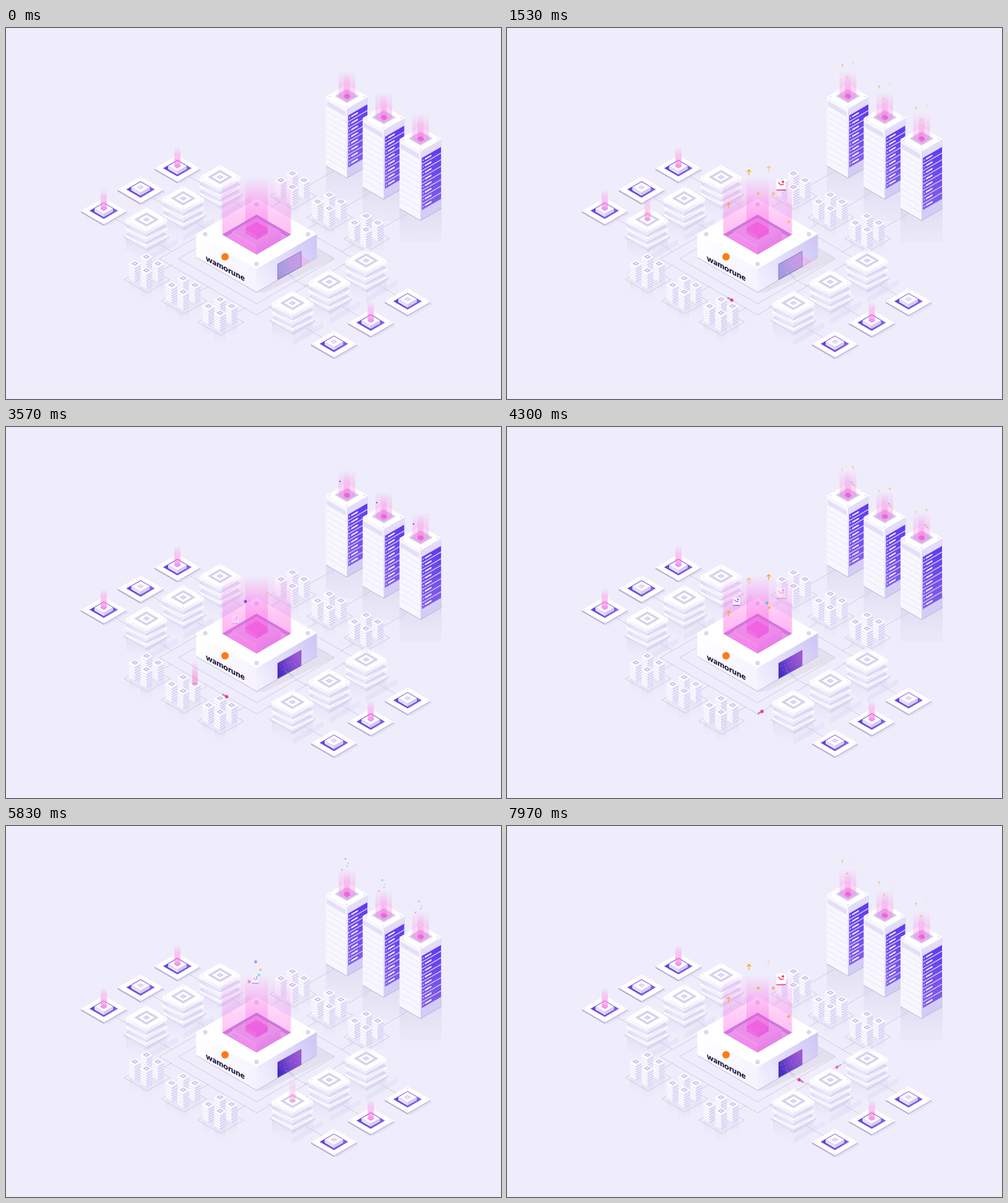
Animation, 800 px wide and 600 px high, one loop 8 s. Source, as an HTML page with a canvas:

```html
<!DOCTYPE html>
<html lang="en">
<head>
<meta charset="utf-8">
<title>Isometric server park</title>
<style>
html, body { margin: 0; width: 100%; height: 100%; overflow: hidden; background: #efedfb; }
#stage { position: absolute; left: 0; top: 0; width: 800px; height: 600px; overflow: hidden; }
canvas { position: absolute; left: 0; top: 0; width: 800px; height: 600px; }
#sign {
  position: absolute; left: 323px; top: 364px; color: #1d1640; white-space: nowrap;
  font: 900 13px/14px Lato, "Open Sans", sans-serif;
  transform: matrix(1, .54, 0, 1, 0, 0); transform-origin: 0 0;
}
</style>
</head>
<body>
<div id="stage"><canvas id="view"></canvas><div id="sign">wamorune</div></div>
<script>
const LOOP = 8000, CYCLE = 3150, SLOPE = .58;
const dpr = window.devicePixelRatio || 1;
const view = document.getElementById('view');
let ctx;

function context(canvas) {
  canvas.width = 800 * dpr;
  canvas.height = 600 * dpr;
  const c = canvas.getContext('2d');
  c.scale(dpr, dpr);
  return c;
}

function layer(paint) {
  const canvas = document.createElement('canvas');
  ctx = context(canvas);
  paint();
  return canvas;
}

const ramp = (t, from, to) => Math.max(0, Math.min(1, (t - from) / (to - from)));
const hump = (t, on, off, fade) => Math.min(ramp(t, on, on + fade), ramp(t, off, off - fade));
const range = n => [...Array(n).keys()];

function gradient(x0, y0, x1, y1, ...colors) {
  const g = ctx.createLinearGradient(x0, y0, x1, y1);
  colors.forEach((c, i) => g.addColorStop(i / (colors.length - 1), c));
  return g;
}

function poly(points, fill, stroke, width = 1) {
  ctx.beginPath();
  points.forEach(([x, y]) => ctx.lineTo(x, y));
  ctx.closePath();
  if (fill) { ctx.fillStyle = fill; ctx.fill(); }
  if (stroke) { ctx.strokeStyle = stroke; ctx.lineWidth = width; ctx.stroke(); }
}

function line(x0, y0, x1, y1, color, width = 1) {
  ctx.beginPath();
  ctx.moveTo(x0, y0);
  ctx.lineTo(x1, y1);
  ctx.strokeStyle = color;
  ctx.lineWidth = width;
  ctx.stroke();
}

function disc(x, y, r, color, flat = 1) {
  ctx.beginPath();
  ctx.ellipse(x, y, r, r * flat, 0, 0, 7);
  ctx.fillStyle = color;
  ctx.fill();
}

function diamond(x, y, w, fill, stroke, width) {
  const h = w * SLOPE;
  poly([[x - w, y], [x, y - h], [x + w, y], [x, y + h]], fill, stroke, width);
}

// A strip of a left (side -1) or right (side 1) face, a..b along its width.
function strip(x, y, w, side, top, height, fill, a = 0, b = 1) {
  const at = u => [x + side * w * u, y + w * SLOPE * (1 - u) + top];
  const [p, q] = [at(a), at(b)];
  poly([p, q, [q[0], q[1] + height], [p[0], p[1] + height]], fill);
}

function box(x, y, w, h, top, left, right) {
  strip(x, y, w, -1, 0, h, left);
  strip(x, y, w, 1, 0, h, right);
  diamond(x, y, w, top);
}

// The two lower edges of a diamond.
function hem(x, y, w, color) {
  for (const side of [-1, 1]) line(x, y + w * SLOPE, x + side * w, y, color, .9);
}

function studs(x, y, w, r, color) {
  for (const s of [-1, 1]) {
    disc(x + s * w, y, r, color);
    disc(x, y + s * w * SLOPE, r, color);
  }
}

function reflection(x, y, w, depth) {
  const g = gradient(0, y, 0, y + w * SLOPE + depth, 'rgba(205,197,235,.34)', 'rgba(225,220,245,0)');
  for (const side of [-1, 1]) strip(x, y, w, side, 0, depth, g);
}

function beam(x, base, w, top, alpha, rgb = '255,110,222') {
  const g = gradient(0, top, 0, base + w * SLOPE, `rgba(${rgb},0)`, `rgba(${rgb},${alpha * .6})`, `rgba(${rgb},${alpha})`);
  poly([[x - w, top], [x + w, top], [x + w, base], [x, base + w * SLOPE], [x - w, base]], g);
}

// Three neighbours along an isometric axis.
const trio = (x, y, right = 1, down = 1) => range(3).map(i => [x + 59.5 * i * right, y + 34.4 * i * down]);
const towers = trio(551, 111);
const plates = [...trio(158, 296, 1, -1), ...trio(649, 442.5, -1)];
const leftStacks = trio(346, 241, -1), rightStacks = trio(582, 376, -1);
const leftGroups = trio(227, 381), rightGroups = trio(463, 246);

const hub = [405, 373], RING = 157;
const south = [hub[0], hub[1] + RING * SLOPE], east = [hub[0] + RING, hub[1]];
const turn = [485, 418], door = [458, 402];

function drawGround() {
  const wire = '#d0cbdf', floor = '#efedfb';
  const link = (x, y, dx, side) => line(x, y, x + dx, y + dx * SLOPE * side, wire);
  ctx.fillStyle = floor;
  ctx.fillRect(0, 0, 800, 600);

  for (const w of [RING, 126]) diamond(...hub, w, null, wire);
  line(...door, ...turn, wire);
  leftStacks.forEach(([x, y]) => { link(x, y + 28, 40, 1); link(x, y + 28, -69, 1); });
  rightStacks.forEach(([x, y]) => { link(x, y + 28, -40, 1); link(x, y + 28, 67, 1); });
  leftGroups.forEach(([x, y]) => link(x, y + 26, 41, -1));
  rightGroups.forEach(([x, y]) => { link(x, y + 24, -41, -1); link(x, y + 24, 88, -1); });

  [...leftStacks, ...rightStacks].forEach(([x, y]) => {
    diamond(x, y + 29, 37, floor, wire);
    reflection(x, y + 30, 33, 20);
    strip(x, y + 31, 50, 1, 0, 9, 'rgba(215,208,238,.3)');
  });
  [...leftGroups, ...rightGroups].forEach(([x, y]) => diamond(x + 1, y + 26, 37, floor, wire));
  towers.forEach(([x, y]) => {
    ctx.fillStyle = gradient(0, y + 112, 0, y + 168, 'rgba(205,198,228,.4)', 'rgba(225,220,242,.25)');
    ctx.fillRect(x - 34, y + 112, 68, 55);
  });
  plates.forEach(([x, y]) => diamond(x + 5, y + 4, 36, 'rgba(208,202,230,.3)'));
  poly([[405, 429], [420, 427], [531, 373], [503, 357]], 'rgba(214,207,220,.45)');
}

function drawPlate([x, y]) {
  box(x, y, 37, 2.6, '#fff', '#b6aed8', '#c9c2e5');
  diamond(x, y - .5, 23, gradient(x - 23, y, x + 23, y, '#6541dd', '#8860e4'));
  box(x, y - 4, 15, 5, '#fbfaff', '#e6e1f9', '#d3ccf3');
  diamond(x, y - 4, 4, '#f1eefb', '#d3cdec', 1.5);
  studs(x, y, 32, .8, '#d9d4ee');
}

function drawStack([x, y]) {
  for (const i of [2, 1, 0]) {
    const py = y + i * 12;
    strip(x, py, 29, -1, 4, 8, '#e6e2f8');
    strip(x, py, 29, 1, 4, 8, '#dcd6f4');
    box(x, py, 33.5, 5, i ? gradient(0, py, 0, py + 18, '#dcd7f5', '#fff') : '#fff',
      gradient(x - 33, 0, x, 0, '#fcfbff', '#f1eefc'), gradient(x, 0, x + 33, 0, '#ece8fa', '#faf9ff'));
  }
  hem(x, y + 29, 33.5, '#cdc6e4');
  diamond(x, y, 16.5, null, '#d6d0ee', 3.4);
  diamond(x, y, 4, '#f0edfb', '#d3cdee', 2);
  studs(x, y, 28, .8, '#d9d4ee');
}

function drawGroup([cx, cy]) {
  for (const [x, y] of [[cx, cy - 11], [cx - 18.7, cy], [cx + 18.7, cy], [cx, cy + 11]]) {
    reflection(x, y + 25, 9.5, 20);
    box(x, y, 9.5, 25, '#fff', '#fcfbff', '#efebfc');
    for (const i of range(6)) {
      strip(x, y, 9.5, -1, 3 + i * 4, 1, '#e2ddf5');
      strip(x, y, 9.5, 1, 3 + i * 4, 1.6, '#cfc8ef');
    }
    diamond(x, y, 4.4, '#f0edfc', '#c8c0e8', 1.6);
  }
}

function drawTower([x, y]) {
  box(x, y, 34, 112, '#fff', '#f8f6fe', gradient(x, y, x + 34, y + 110, '#e6e0fb', '#d3ccf5'));
  strip(x, y, 34, -1, 6, 8, '#e4e0f6', .06, .96);
  for (const i of range(9)) strip(x, y, 34, -1, 22 + i * 9.6, 1, '#e8e4f8', .04, .96);
  const slot = gradient(0, y, 0, y + 115, '#5a36f2', '#8561e8');
  for (const i of range(8)) {
    const top = 12 + i * 10.7;
    strip(x, y, 34, 1, top, 9.2, slot, .06, .97);
    strip(x, y, 34, 1, top + 3.4, 2.4, '#f3efff', .2, .52);
    strip(x, y, 34, 1, top + 3.6, 2, '#e5dcff', .1, .15);
  }
  hem(x, y + 112, 34, '#b4acd0');
  diamond(x, y - 1, 19.5, '#d3cbee');
  diamond(x, y, 13.5, '#dcc4ee');
  box(x, y - 2, 5, 3, '#df4fcc', '#e86fdc', '#d25bd6');
  studs(x, y, 28, 1, '#cfc8ea');
  beam(x, y, 13.5, y - 42, .4);
  beam(x, y - 1, 5, y - 40, .4);
}

function drawHall() {
  box(405, 333, 97.5, 38, '#fff', gradient(308, 340, 405, 400, '#fff', '#f6f3fe'),
    gradient(405, 410, 503, 350, '#f3f0ff', '#cfc7f6'));
  hem(405, 371, 97.5, '#b9b2d6');
  studs(405, 333.5, 83, 3.6, '#dcd7ef');
  diamond(405, 334, 55.5, '#ad7cd4');
  diamond(405, 337, 49, '#dcb6ee');
  box(405, 335, 39, 8, '#d6a2e8', '#e2aaf0', '#cf98ea');
  box(405, 329, 39, 5, '#dba8ea', '#e8b6f2', '#d39fec');
  box(405, 324, 18, 8, '#d868d6', '#e070de', '#d35cd8');
  disc(354, 370, 6, '#ff7a14');
}

const ground = layer(drawGround);
const park = layer(() => {
  towers.forEach(drawTower);
  plates.forEach(drawPlate);
  [...leftStacks, ...rightStacks].forEach(drawStack);
  [...leftGroups, ...rightGroups].forEach(drawGroup);
  drawHall();
  [plates[0], plates[2], plates[4]].forEach(([x, y]) => beam(x, y - 3, 5, y - 35, .68));
});

// A sender lights up, then a parcel leaves it and follows the wires at an even speed.
const shift = ([x, y], dx, dy) => [x + dx, y + dy];
const fromGroup = (group, leaves) => ({
  lamp: shift(group, 18.7, 0), leaves, speed: .076,
  path: [shift(group, 23, 13), shift(group, 41, 4), south, turn, door]
});
const senders = [
  fromGroup(leftGroups[0], 40),
  fromGroup(leftGroups[1], 2950),
  { lamp: leftStacks[2], leaves: 1850, speed: .076,
    path: [shift(leftStacks[2], 21, 41), shift(leftStacks[2], 40, 52), [318, 332]] },
  { lamp: rightStacks[2], leaves: 6270, speed: .057,
    path: [shift(rightStacks[2], -18, 18), shift(rightStacks[2], -40, 7), turn, door] },
  { lamp: shift(rightGroups[2], -18.7, 0), leaves: 6620, speed: .057,
    path: [shift(rightGroups[2], -8, 31), shift(rightGroups[2], -38, 48), east, [528, 393]] }
];
senders.forEach(s => {
  s.length = s.path.slice(1).reduce((sum, p, i) => sum + Math.abs(p[0] - s.path[i][0]), 0);
});

function along(path, distance) {
  for (let i = 1; i < path.length; i++) {
    const [a, b] = [path[i - 1], path[i]], run = Math.abs(b[0] - a[0]);
    if (distance <= run) {
      const u = Math.max(0, distance / run);
      return [a[0] + (b[0] - a[0]) * u, a[1] + (b[1] - a[1]) * u];
    }
    distance -= run;
  }
  return path[path.length - 1];
}

function drawParcel({ path, leaves, speed, length }, t) {
  const gone = (t - leaves) * speed;
  if (gone < 0 || gone > length) return;
  const [x, y] = along(path, gone);
  ctx.globalAlpha = hump(gone, 0, length, 9);
  ctx.lineCap = 'round';
  line(...along(path, gone - 6), x, y, 'rgba(150,90,165,.6)', 3);
  ctx.lineCap = 'butt';
  disc(x, y, 2.6, '#f5358c');
  ctx.globalAlpha = 1;
}

function drawLamp({ lamp: [x, y], leaves }, t) {
  const level = hump(t, Math.max(0, leaves - 800), leaves + 1250, 550);
  if (level > 0) beam(x, y, 4.6, y - 36, .55 * level, '250,100,200');
}

// Things rising in the light; places are those at birth, arrows and pages come at even intervals.
const amber = '#f9a52b', violet = '#5a35e8', teal = '#1fcfd0', rose = '#f4376f';
const risers = [
  ...[[423, 277], [358, 324], [391, 259]].map(([x, y], i) =>
    ({ kind: 'arrow', x, y, birth: 300 + 300 * i, life: 1450, size: 4.6, color: amber })),
  ...[[371, 315], [443, 273], [403, 286]].map(([x, y], i) =>
    ({ kind: 'page', x, y, birth: 300 + 700 * i, life: 1200, size: i === 1 ? 15 : 11, color: [violet, rose][i % 2] })),
  ...dots(500, [teal, amber], i => [420 + 4 * i, 311 + 7 * i]),
  ...dots(1300, [amber, amber, amber], i => [406 + 24.5 * i, 277 + 23 * i * (i - 1)]),
  ...dots(1900, [rose, violet, teal, amber], i => [414 - 21 / 2 ** i, 267 + 16 * Math.cos(Math.PI * i) / Math.max(1, 2 * i - 1)]),
  ...dots(2950, [violet], () => [387, 307])
];

function dots(birth, colors, place) {
  return colors.map((color, i) => {
    const [x, y] = place(i);
    return { kind: 'dot', x, y, birth, life: 1000, size: 2.4, color };
  });
}

const shapes = {
  dot: disc,
  arrow(x, y, s, color) {
    const w = s * .3;
    line(x, y - s, x, y + s, color, w);
    for (const side of [-.75, .75]) line(x + s * side, y - s * .2, x, y - s, color, w);
  },
  page(x, y, s, color) {
    const h = s / 2;
    ctx.fillStyle = '#fff';
    ctx.fillRect(x - h, y - h, s, s * 1.05);
    ctx.fillStyle = color;
    ctx.fillRect(x - h, y + s * .65, s, s * .1);
    line(x - h * .6, y - h * .3, x - h * .1, y + h * .3, color, s * .1);
    line(x - h * .1, y + h * .3, x + h * .6, y + h * .1, color, s * .1);
    disc(x + h * .4, y - h * .4, s * .13, color);
  }
};

function drawRiser({ kind, x, y, birth, life, size, color }, t) {
  if (t < birth) return;
  const age = (t - birth) % CYCLE;
  if (age > life) return;
  const py = y - age * .04;
  ctx.globalAlpha = hump(age, 0, life, 450);
  shapes[kind](x, py, size, color);
  // The towers repeat the central ones at about half the size.
  if (kind !== 'page' && Math.abs(x - 405) < 25) {
    towers.forEach(([tx, ty]) =>
      shapes[kind](tx - 1 + (x - 406) * .54, ty - 36 + (py - 259) * .56, size * .5, color));
  }
  ctx.globalAlpha = 1;
}

function drawDoor(t) {
  const left = 439, right = 477;
  const open = ramp(t, 1950, 2820), slide = (right - left) * open;
  const panel = (x0, x1, fill, stroke) => {
    const y = x => 382 - (x - left) * .55;
    poly([[x0, y(x0)], [x1, y(x1)], [x1, y(x1) + 25], [x0, y(x0) + 25]], fill, stroke);
  };
  panel(left, right, gradient(440, 395, 477, 375, '#452cc0', '#7b4ace', '#a058d6'));
  for (const i of range(12)) disc(443 + i * 2.8, 387 - i * 1.6 + i * 7 % 13, .6, i % 3 ? '#d65ad8' : '#e6a0e8');
  line(450, 394, 465, 403, '#a788e8', .7);

  const guest = hump(t, 6500, 7300, 300);
  if (guest > 0) {
    ctx.globalAlpha = guest * .75;
    for (const i of range(9)) {
      const reach = 3.5 * Math.sin((i + 1) * Math.PI / 10);
      line(463 - reach, 370 + i * 2.6, 463 + reach, 368 + i * 2.6, '#d8b4f4', .8);
    }
    ctx.globalAlpha = 1;
  }

  if (open < 1) {
    panel(left + slide, right, gradient(left, 390, right, 372, 'rgba(214,208,242,.66)', 'rgba(232,205,238,.58)'));
    panel(right, Math.min(right + slide, 501), `rgba(250,247,255,${.75 * (1 - open)})`);
    poly([[right, 368], [492, 377], [right, 388]], `rgba(250,150,225,${.35 * (1 - open)})`);
  }
  panel(left, right, null, 'rgba(85,65,155,.5)');
}

function drawMainBeam(t) {
  const power = 1 + .15 * Math.sin(t / CYCLE * 2 * Math.PI);
  beam(405, 334, 55.5, 240, .58 * power, '255,110,232');
  beam(405, 326, 18, 240, .4 * power, '250,85,225');
}

const screen = context(view);

function frame() {
  const t = performance.now() % LOOP;
  ctx = screen;
  ctx.drawImage(ground, 0, 0, 800, 600);
  senders.forEach(s => drawParcel(s, t));
  ctx.drawImage(park, 0, 0, 800, 600);
  drawDoor(t);
  drawMainBeam(t);
  senders.forEach(s => drawLamp(s, t));
  risers.forEach(r => drawRiser(r, t));
  requestAnimationFrame(frame);
}
frame();
</script>
</body>
</html>
```
